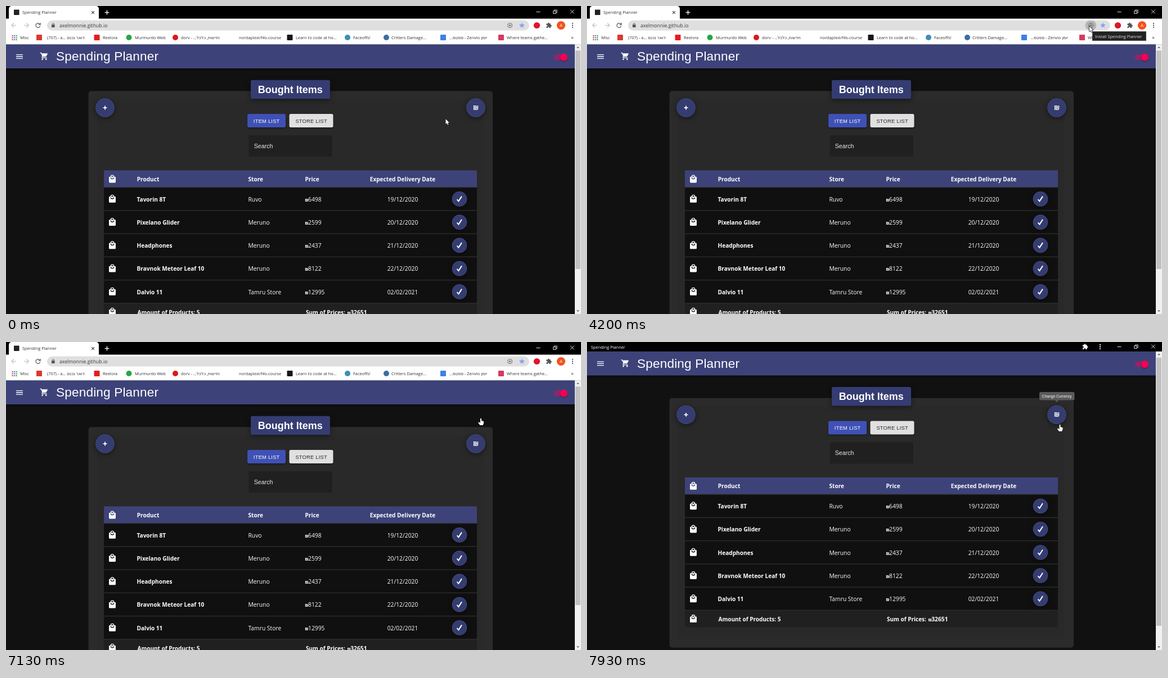
Recreate the animation shown at these times as an HTML page with a canvas. Size 1022 by 548 pixels, loop 8000 ms.

```html
<!DOCTYPE html>
<html lang="en">
<head>
<meta charset="utf-8">
<title>Spending Planner</title>
<style>
html, body { margin: 0; width: 100%; height: 100%; overflow: hidden; background: #111; }
canvas { display: block; width: 1022px; height: 548px; }
</style>
</head>
<body>
<canvas id="stage"></canvas>
<script>
const W = 1022, H = 548, LOOP = 8000;
const canvas = document.getElementById('stage');
const ctx = canvas.getContext('2d');
const dpr = window.devicePixelRatio || 1;
canvas.width = W * dpr;
canvas.height = H * dpr;

const UI = "'Open Sans', 'Noto Sans', 'DejaVu Sans', sans-serif";
const ARIAL = "'Liberation Sans', Arial, sans-serif";
const APP = 'Spending Planner';
const URL_TEXT = 'axelmonnie.github.io';

const ICONS = {
  menu: 'M3 18h18v-2H3zM3 13h18v-2H3zM3 6v2h18V6z',
  cart: 'M7 18a2 2 0 1 0 0 4 2 2 0 0 0 0-4zM1 2v2h2l3.6 7.6-1.35 2.4C4.5 15.4 5.5 17 7 17h12v-2H7.4c-.2 0-.3-.2-.2-.4l.9-1.6h7.45c.75 0 1.4-.4 1.75-1l3.6-6.5c.3-.7-.1-1.5-.9-1.5H5.2l-.9-2zM17 18a2 2 0 1 0 0 4 2 2 0 0 0 0-4z',
  bag: 'M19 6h-2A5 5 0 0 0 7 6H5a2 2 0 0 0-2 2v12a2 2 0 0 0 2 2h14a2 2 0 0 0 2-2V8a2 2 0 0 0-2-2zM12 3a3 3 0 0 1 3 3H9a3 3 0 0 1 3-3zM12 13a5 5 0 0 1-5-5h2a3 3 0 0 0 6 0h2a5 5 0 0 1-5 5z',
  puzzle: 'M20.5 11H19V7a2 2 0 0 0-2-2h-4V3.5a2.5 2.5 0 0 0-5 0V5H4a2 2 0 0 0-2 2v3.8h1.5a2.7 2.7 0 0 1 0 5.4H2V20a2 2 0 0 0 2 2h3.8v-1.5a2.7 2.7 0 0 1 5.4 0V22H17a2 2 0 0 0 2-2v-4h1.5a2.5 2.5 0 0 0 0-5z',
  arrow: 'M0 0V9.2L2.1 7.3 3.6 10.7 5 10.1 3.6 6.8H6.5z',
  hand: 'M-1 1Q0-.6 1 1V4.6L4.4 5.6Q5.4 6 5.3 7.4L4.5 10.5 3.6 12.6H-1.6L-4.4 8.4Q-4.8 7-3.4 7L-1 8.4z'
};
for (const k in ICONS) ICONS[k] = new Path2D(ICONS[k]);

const rows = [
  ['Tavorin 8T', 'Ruvo', '6498', '19/12/2020'],
  ['Pixelano Glider', 'Meruno', '2599', '20/12/2020'],
  ['Headphones', 'Meruno', '2437', '21/12/2020'],
  ['Bravnok Meteor Leaf 10', 'Meruno', '8122', '22/12/2020'],
  ['Dalvio 11', 'Tamru Store', '12995', '02/02/2021']
];

// x of icon, colour, shape, x of label, label
const bookmarks = [
  [59, '#d93a2f', 'square', 73, '(707) - a... דואר נכנס'],
  [161.5, '#e81c1c', 'square', 172, 'Reelora'],
  [218.5, '#25a843', 'circle', 229, 'Murmurdo Web'],
  [301, '#d81a1a', 'circle', 311, 'dorv - ...חדשות, כלכל'],
  [0, '', '', 414, 'nordaplexi/f4s-course'],
  [504.5, '#15151c', 'square', 515, 'Learn to code at ho...'],
  [607, '#3f8fb5', 'circle', 617, 'Faceoffs!'],
  [676, '#3a6ea5', 'circle', 685, 'Critters Damage...'],
  [777, '#3f7fe8', 'square', 788, '...ספטמ - Zenvio יומן'],
  [880, '#d9385f', 'square', 890, 'Where teams gathe...']
];

// time, x, y of the pointer's hot spot
const path = [
  [0, 781.5, 201], [70, 781.5, 203], [870, 714, 374], [930, 715, 358], [1730, 944, 48],
  [1800, 942, 46], [2020, 890, 3], [2300, 775, 66], [2600, 862, 35],
  [2670, 850, 42], [2800, 560, 110], [2970, 104, 50], [3200, 560, 16], [3470, 943, 46],
  [3530, 936, 44], [3800, 893, 36], [5070, 893, 36], [5320, 903, 90], [5520, 840, 145],
  [5870, 748, 100], [6070, 818.5, 66], [6330, 875, 95], [6530, 752, 122],
  [6730, 844, 135.5], [7400, 844, 135.5], [7850, 840.5, 146.5], [8000, 840.5, 146.5]
];

function text(s, x, y, size, color, { font = UI, weight = 400, align = 'left', gap = 0 } = {}) {
  ctx.font = `${weight} ${size}px ${font}`;
  ctx.fillStyle = color;
  ctx.textAlign = align;
  ctx.letterSpacing = gap + 'px';
  ctx.fillText(s, x, y);
}

function rect(x, y, w, h, color, r = 0) {
  ctx.fillStyle = color;
  ctx.beginPath();
  ctx.roundRect(x, y, w, h, r);
  ctx.fill();
}

function circle(x, y, r, color) {
  ctx.fillStyle = color;
  ctx.beginPath();
  ctx.arc(x, y, r, 0, 7);
  ctx.fill();
}

function line(points, color, width = 1) {
  ctx.strokeStyle = color;
  ctx.lineWidth = width;
  ctx.beginPath();
  points.forEach(([x, y]) => ctx.lineTo(x, y));
  ctx.stroke();
}

function cross(x, y, r, color, width = 1) {
  line([[x - r, y - r], [x + r, y + r]], color, width);
  line([[x + r, y - r], [x - r, y + r]], color, width);
}

function plus(x, y, r, color, width) {
  line([[x - r, y], [x + r, y]], color, width);
  line([[x, y - r], [x, y + r]], color, width);
}

function icon(name, x, y, scale, color) {
  ctx.save();
  ctx.translate(x, y);
  ctx.scale(scale, scale);
  ctx.fillStyle = color;
  ctx.fill(ICONS[name], 'evenodd');
  ctx.restore();
}

function shadowed(blur, dy, alpha, draw) {
  ctx.save();
  ctx.shadowColor = `rgba(0,0,0,${alpha})`;
  ctx.shadowBlur = blur * dpr;
  ctx.shadowOffsetY = dy * dpr;
  draw();
  ctx.restore();
}

function roundButton(x, y, r) {
  shadowed(8, 2, 0.5, () => circle(x, y, r, '#454d86'));
  circle(x, y, r - 0.8, '#353c70');
}

function price(x, y, n, weight, size) {
  text('₪', x, y, 7, '#fff', { weight: 700 });
  text(n, x + 5.7, y, size, '#fff', { weight });
}

function scrollbar(top, thumbEnd) {
  rect(1011, top, 11, H - top, '#f1f1f1');
  rect(1012, top + 11, 9, thumbEnd - top - 11, '#c1c1c1');
  for (const [y, d] of [[top + 5.5, -1], [H - 5.5, 1]]) {
    ctx.fillStyle = '#606060';
    ctx.beginPath();
    ctx.moveTo(1014, y - d);
    ctx.lineTo(1019, y - d);
    ctx.lineTo(1016.5, y + d * 1.6);
    ctx.fill();
  }
}

function table() {
  const bold = { weight: 700 };
  rect(174, 292.6, 663, 266.4, '#303030');
  rect(174, 292.6, 663, 29.4, '#3d4379');
  icon('bag', 181, 299.8, 0.665, '#fff');
  text('Product', 232.7, 311.7, 10.1, '#fff', bold);
  text('Store', 430.5, 311.7, 10.1, '#fff', bold);
  text('Price', 531.5, 311.7, 10.1, '#fff', bold);
  text('Expected Delivery Date', 705, 311.7, 10.1, '#fff', { weight: 700, align: 'center' });
  rows.forEach(([name, store, cost, date], i) => {
    const top = 323.3 + i * 41.25, base = top + 24.4, mid = top + 20.1;
    rect(174, top, 663, 40, '#101010');
    icon('bag', 181, mid - 8.3, 0.665, '#fff');
    text(name, 232.5, base, 10.1, '#fff', bold);
    text(store, 430.5, base, 10.3, '#fff');
    price(531.3, base, cost, 400, 10.3);
    text(date, 705, base, 10.3, '#fff', { align: 'center' });
    roundButton(806, mid, 13.3);
    line([[801.6, mid + 0.8], [804.4, mid + 4], [810, mid - 4.8]], '#fff', 2);
  });
  rect(174, 529.4, 663, 29.6, '#202020');
  icon('bag', 181, 536, 0.665, '#fff');
  text('Amount of Products: 5', 233.5, 548.6, 10, '#fff', bold);
  text('Sum of Prices:', 533, 548.6, 10, '#fff', bold);
  price(606.5, 548.6, '32651', 700, 10.3);
}

function page(dy) {
  rect(0, 0, W, H, '#111');
  ctx.save();
  ctx.translate(0, dy);
  rect(146.5, 151.3, 718.5, 444, '#2b2b2b', 5);
  rect(162, 167, 687, 412, '#292929', 5);

  shadowed(5, 1.5, 0.5, () => rect(0, 68.3, W, 42.7, '#3d4379'));
  icon('menu', 16, 82, 0.665, '#fff');
  icon('cart', 60, 81.5, 0.665, '#fff');
  text(APP, 89, 97.3, 22.6, '#fff', { font: ARIAL, gap: 0.16 });
  rect(974, 86.5, 22.6, 9.3, 'rgba(245,0,87,.5)', 4.6);
  shadowed(2, 1, 0.4, () => circle(991.5, 91.2, 6.6, '#f50057'));

  shadowed(8, 2, 0.5, () => rect(435, 131.7, 141, 33.3, '#353c72', 3));
  text('Bought Items', 505.3, 154.6, 18, '#fff', { font: ARIAL, weight: 700, align: 'center' });
  roundButton(176, 181, 16.7);
  plus(176, 181, 3.4, '#fff', 1.7);
  roundButton(835, 181, 16.7);
  text('₪', 835, 185, 11, '#fff', { weight: 700, align: 'center' });

  const label = { font: ARIAL, align: 'center', gap: 0.25 };
  shadowed(3, 1.5, 0.4, () => {
    rect(429, 192, 68, 24, '#3f51b5', 2.7);
    rect(503.5, 192, 78, 24, '#e0e0e0', 2.7);
  });
  text('ITEM LIST', 463.2, 207.5, 9.3, '#fff', label);
  text('STORE LIST', 542.7, 207.5, 9.3, '#2a2a2a', label);
  rect(431.5, 230, 148.5, 38, '#202020', 3);
  text('Search', 440.7, 252.7, 10.65, '#e8e8e8', { font: ARIAL });
  table();
  ctx.restore();
}

function windowButtons(y) {
  line([[942.5, y + 0.5], [949.5, y + 0.5]], '#ddd');
  ctx.strokeRect(972.8, y - 1.2, 4.6, 4.6);
  line([[974.5, y - 1.5], [974.5, y - 3], [979.3, y - 3], [979.3, y + 1.8], [977.6, y + 1.8]], '#ddd', 0.9);
  cross(1006.5, y, 3.3, '#ddd');
}

function kebab(x, y, color) {
  for (const d of [-3.6, 0, 3.6]) circle(x, y + d, 1.15, color);
}

function star(x, y, r, color) {
  ctx.fillStyle = color;
  ctx.beginPath();
  for (let i = 0; i < 10; i++) {
    const a = i * Math.PI / 5 - Math.PI / 2, q = i % 2 ? r * 0.42 : r;
    ctx.lineTo(x + q * Math.cos(a), y + q * Math.sin(a));
  }
  ctx.fill();
}

function arrowIcon(x, y, d, color) {
  line([[x - 4 * d, y], [x + 4 * d, y]], color, 1.1);
  line([[x + 0.2 * d, y - 4], [x + 4.2 * d, y], [x + 0.2 * d, y + 4]], color, 1.1);
}

function browser(hover) {
  rect(0, 0, W, 23, '#000');
  rect(5, 0, 160, 30, '#fff', 5);
  rect(0, 22.5, W, 45.8, '#fff');
  rect(14, 6.5, 9.5, 9.5, '#222');
  text(APP, 29, 14, 7.4, '#333');
  cross(154.5, 11.5, 2.4, '#333', 1.1);
  plus(179.5, 11.5, 4, '#fff', 1.3);
  windowButtons(10);

  arrowIcon(14, 34.3, -1, '#bcbcbc');
  arrowIcon(36, 34.3, 1, '#bcbcbc');
  ctx.strokeStyle = '#4a4a4a';
  ctx.lineWidth = 1.2;
  ctx.beginPath();
  ctx.arc(57, 34.5, 3.9, 0.3, 5.6);
  ctx.stroke();
  line([[61.2, 30], [61.2, 33.2], [57.8, 33.2]], '#4a4a4a', 1.2);

  rect(73, 25.5, 857, 18, '#dfdfdf', 9);
  rect(81, 33, 5.6, 5, '#555', 0.6);
  ctx.strokeStyle = '#555';
  ctx.lineWidth = 1;
  ctx.beginPath();
  ctx.arc(83.8, 32.6, 1.8, Math.PI, 0);
  ctx.stroke();
  text(URL_TEXT, 95, 37.7, 8.7, '#3a3a3a');

  if (hover) rect(885.5, 26, 20, 17, '#b5b5b5', 8.5);
  ctx.strokeStyle = '#5a5a5a';
  ctx.lineWidth = 0.9;
  ctx.beginPath();
  ctx.arc(895.7, 34.5, 4, 0, 7);
  ctx.stroke();
  plus(895.7, 34.5, 2.2, '#5a5a5a', 0.9);
  star(917, 34.6, 5.4, '#7ba4f7');
  circle(943.5, 34.5, 5.6, '#e0152b');
  icon('puzzle', 959.5, 29, 0.46, '#555');
  circle(986.5, 34.5, 7.6, '#f4511e');
  text('A', 986.5, 37.4, 8, '#fff', { align: 'center' });
  kebab(1007, 34.5, '#555');

  const dots = ['#e0493e', '#4a8df0', '#3da557', '#f0b429'];
  for (let i = 0; i < 9; i++) {
    rect(10.5 + i % 3 * 3.5, 51.8 + Math.floor(i / 3) * 3.5, 2.2, 2.2, dots[(i + Math.floor(i / 3)) % 4]);
  }
  text('Misc', 25.3, 58.8, 7.4, '#333');
  for (const [x, color, shape, tx, label] of bookmarks) {
    if (shape === 'square') rect(x - 5, 51, 10, 10, color, 1);
    if (shape === 'circle') circle(x, 56, 5, color);
    text(label, tx, 58.8, 7.4, '#333');
  }
  text('»', 1006.5, 58.8, 9, '#333', { align: 'center' });
}

function appBar() {
  rect(0, 0, W, 16.5, '#000');
  text(APP, 7, 11.6, 7.4, '#fff');
  icon('puzzle', 880, 2.8, 0.46, '#fff');
  kebab(912, 8.5, '#fff');
  windowButtons(8);
}

function installTip() {
  rect(898, 45, 96, 17, '#5a5a5a');
  rect(898.7, 45.7, 94.6, 15.6, '#222');
  text('Install ' + APP, 903, 56.6, 7.4, '#e4e4e4');
}

function dialog(alpha) {
  ctx.save();
  ctx.globalAlpha = alpha;
  shadowed(4, 1, 0.5, () => rect(715.5, 43.5, 213.5, 116.5, '#292a2d', 2));
  text('Install app?', 726, 66, 9.5, '#e8eaed');
  cross(918, 54, 2.7, '#c4c7cc', 1.1);
  rect(728, 82, 28, 28, '#000');
  text(APP, 768, 90, 8.1, '#e8eaed');
  text(URL_TEXT, 768, 102.3, 7.6, '#9aa0a6');
  rect(822.5, 128, 45, 22, '#8ab4f8', 2.5);
  text('Install', 844.5, 141.8, 7.4, '#202124', { weight: 600, align: 'center' });
  ctx.strokeStyle = '#3c4043';
  ctx.lineWidth = 0.8;
  ctx.strokeRect(873.2, 128.4, 44.8, 21.2);
  text('Cancel', 895.5, 141.8, 7.4, '#8ab4f8', { weight: 600, align: 'center' });
  ctx.restore();
}

function currencyTip(alpha) {
  ctx.save();
  ctx.globalAlpha = alpha;
  rect(804, 89, 62.5, 14.5, '#5a5a5a', 2.5);
  ctx.beginPath();
  ctx.moveTo(831.5, 103.5);
  ctx.lineTo(838.5, 103.5);
  ctx.lineTo(835, 107);
  ctx.fill();
  text('Change Currency', 835, 98.7, 6.65, '#fff', { font: ARIAL, weight: 500, align: 'center', gap: 0.05 });
  ctx.restore();
}

function pointerAt(t) {
  let i = 1;
  while (i < path.length - 1 && t > path[i][0]) i++;
  const [t0, x0, y0] = path[i - 1], [t1, x1, y1] = path[i];
  const u = (t - t0) / (t1 - t0), e = u * u * (3 - 2 * u);
  return [x0 + (x1 - x0) * e, y0 + (y1 - y0) * e];
}

function pointer(t) {
  const [x, y] = pointerAt(t);
  if (y > 26 && y < 44 && x > 90 && x < 885 && t < 4400) {
    line([[x - 2, y - 4.5], [x + 2, y - 4.5]], '#222');
    line([[x, y - 4.5], [x, y + 4.5]], '#222');
    line([[x - 2, y + 4.5], [x + 2, y + 4.5]], '#222');
    return;
  }
  const onInstall = t > 4700 && x > 822 && x < 867 && y > 128 && y < 150;
  const shape = ICONS[onInstall || t > 7000 ? 'hand' : 'arrow'];
  ctx.save();
  ctx.translate(x, y);
  ctx.lineJoin = 'round';
  ctx.lineWidth = 1.4;
  ctx.strokeStyle = '#111';
  ctx.stroke(shape);
  ctx.fillStyle = '#fff';
  ctx.fill(shape);
  ctx.restore();
}

const ramp = (t, a, b) => Math.min(1, Math.max(0, (t - a) / (b - a)));

function draw(t) {
  ctx.setTransform(dpr, 0, 0, dpr, 0, 0);
  if (t < 7270) {
    page(0);
    scrollbar(68.3, 468);
    browser(t >= 3730 && t < 7130);
    if (t >= 4200 && t < 4400) installTip();
    const alpha = ramp(t, 4400, 4730) * (t < 7070 ? 1 : t < 7130 ? 0.5 : 0);
    if (alpha) dialog(alpha);
  } else if (t < 7330) {
    rect(0, 0, W, H, '#fff');
  } else if (t < 7470) {
    rect(0, 0, W, H, '#111');
    appBar();
    rect(0, 16, W, 1, '#444');
  } else {
    page(-51.6);
    scrollbar(16.7, 505);
    appBar();
    currencyTip(ramp(t, 7600, 7800));
  }
  pointer(t);
}

function tick() {
  draw(performance.now() % LOOP);
  requestAnimationFrame(tick);
}
tick();
</script>
</body>
</html>
```
